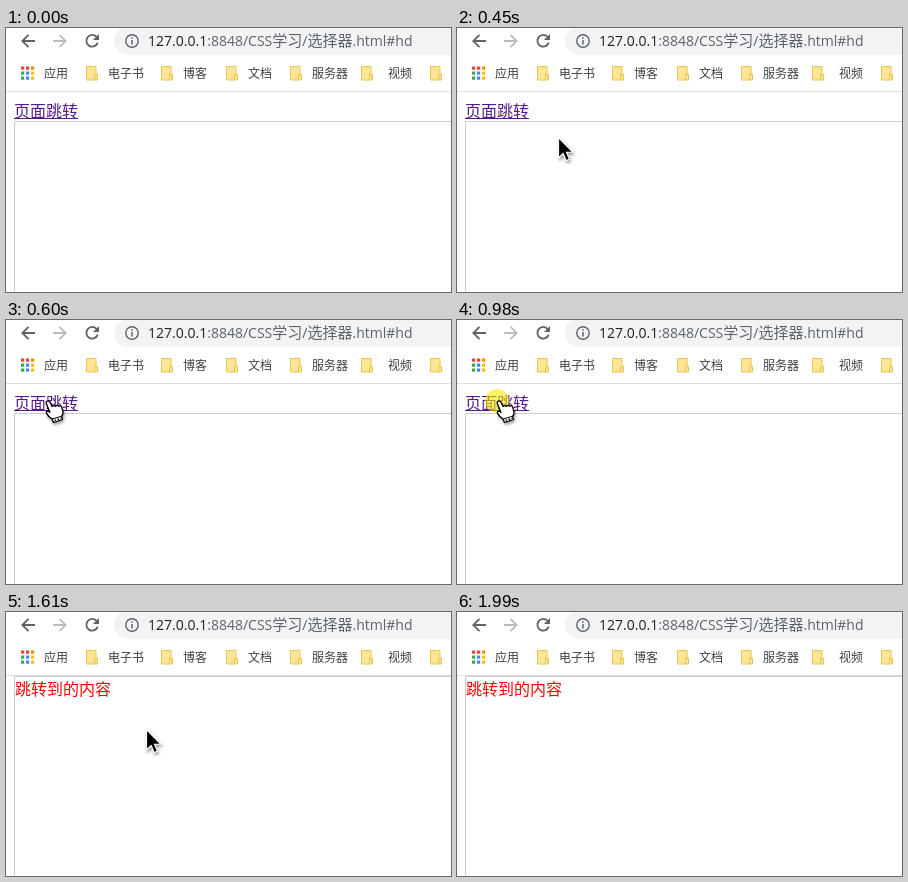
Animation, 445 px wide and 264 px high, one loop 2620 ms. Source, as an HTML page:

```html
<!DOCTYPE html>
<html lang="zh-CN">
<head>
<meta charset="utf-8">
<title>页面跳转</title>
<style>
  html, body { margin: 0; width: 100%; height: 100%; overflow: hidden; background: #fff; }
  svg { display: block; width: 445px; height: 264px; }
  text { font-family: "Open Sans", "Noto Sans CJK SC", "Noto Sans CJK", sans-serif; white-space: pre; }
  .cjk { font-family: "Noto Sans CJK SC", "Noto Sans CJK", sans-serif; }
  .url { font-size: 14px; fill: #5f6368; }
  .url .cjk { font-size: 15px; }
  .mark { font-size: 12px; fill: #3c4043; }
  .body { font-size: 16px; }
  .line { fill: none; stroke-width: 1.8; }
  .cursor { filter: drop-shadow(1px 2px 1.5px rgba(0, 0, 0, .4)); }
</style>
</head>
<body>
<svg viewBox="0 0 445 264">
  <rect width="445" height="264" fill="#fff"/>

  <!-- address bar -->
  <path id="back" class="line" stroke="#5f6368" d="M29 13H16.5M22.5 6.8L16.3 13L22.5 19.2"/>
  <path class="line" stroke="#babcbe" d="M47 13H59.5M53.5 6.8L59.7 13L53.5 19.2"/>
  <path class="line" stroke="#5f6368" d="M90.6 9A5.8 5.8 0 1 0 91.7 14.6"/>
  <path fill="#5f6368" d="M93 6V12H87Z"/>
  <rect x="108" y="-1" width="380" height="28" rx="14" fill="#f1f3f4"/>
  <circle cx="126" cy="13" r="6.2" fill="none" stroke="#5f6368" stroke-width="1.4"/>
  <path stroke="#5f6368" stroke-width="1.5" d="M126 12V16.5M126 9.3V10.8"/>
  <text class="url" x="142" y="18"><tspan fill="#202124">127.0.0.1</tspan>:8848/CSS<tspan class="cjk">学习</tspan>/<tspan class="cjk">选择器</tspan>.html#hd</text>

  <g id="marks"></g>
  <path stroke="#dadce0" d="M0 63.5H445"/>

  <!-- page before and after the jump -->
  <g id="top">
    <text class="body cjk" x="8" y="89" fill="#551a8b">页面跳转</text>
    <path stroke="#551a8b" d="M8 90.5H72"/>
    <path fill="none" stroke="#ccc" d="M445 93.5H8.5V264"/>
  </g>
  <g id="jumped">
    <path fill="none" stroke="#ccc" d="M445 64.5H8.5V264"/>
    <text class="body cjk" x="9" y="82.5" fill="#f00">跳转到的内容</text>
  </g>

  <circle id="press" cx="40" cy="81" r="12" fill="#f5ec00" opacity=".6"/>

  <g id="arrow" class="cursor">
    <path transform="scale(1.22)" fill="#000" stroke="#fff" stroke-width="1"
      d="M.4 .4V17.2L4.2 13.6L6.7 19.4L9.5 18.2L7 12.5H12.3Z"/>
  </g>
  <g id="hand" class="cursor">
    <path fill="#fff" stroke="#000" stroke-width="1.3" stroke-linejoin="round"
      d="M40.5 84Q39.5 81 42 80.8Q43.6 80.8 44.4 83L46 86.5Q48 84.8 49.4 86.4Q51.4 84.6 52.8 86.2
         Q55 85 55.8 87.4L57 92Q57.2 94.5 55.5 96.5L56.5 99.5L47.5 102.5L46 99Q42.5 97 40.8 93.6
         Q39.6 91.4 41.6 91Q43 91 44 92.4Z"/>
    <path fill="none" stroke="#000" d="M46 99L55.5 96.3"/>
    <path stroke="#000" stroke-width="1.4" stroke-dasharray="1.5 1.6" d="M48.6 100.4L55 98.4"/>
  </g>
  <g id="beam" fill="none">
    <path id="stem" stroke="#fff" stroke-width="3" d="M37 74H39.5L40.5 75L41.5 74H44M40.5 75V89M37 90H39.5L40.5 89L41.5 90H44"/>
    <use href="#stem" style="display:none"/>
    <path stroke="#000" stroke-width="1.3" d="M37 74H39.5L40.5 75L41.5 74H44M40.5 75V89M37 90H39.5L40.5 89L41.5 90H44M38.5 82.5H42.5"/>
  </g>
</svg>
<script>
const LOOP = 2620;
const $ = id => document.getElementById(id);

function add(name, attrs, label) {
  const el = document.createElementNS("http://www.w3.org/2000/svg", name);
  for (const key in attrs) el.setAttribute(key, attrs[key]);
  if (label) el.textContent = label;
  $("marks").append(el);
}

// bookmarks: icon x, text x, label
const bookmarks = [
  [80, 102, "电子书"], [155, 177, "博客"], [220, 242, "文档"],
  [284, 306, "服务器"], [355, 382, "视频"], [424, 446, ""]
];
const label = (x, text) => add("text", { x, y: 50, class: "mark cjk" }, text);

const dots = ["#ea4335", "#ea4335", "#fb8c00", "#34a853", "#4285f4", "#fbbc05", "#34a853", "#4285f4", "#fbbc05"];
dots.forEach((fill, i) => add("rect", {
  x: 15 + i % 3 * 5, y: 38.5 + Math.floor(i / 3) * 5, width: 3.2, height: 3.2, fill
}));
label(38, "应用");
for (const [x, tx, text] of bookmarks) {
  add("path", { d: `M${x + .5} 38.5h9.5v8h1.5v5.5h-11z`, fill: "#ffe694", stroke: "#e8c454" });
  add("path", { d: `M${x + 8.5} 52v-5.5h3`, fill: "none", stroke: "#e8c454" });
  label(tx, text);
}

// start time, pointer kind, arrow tip
const steps = [
  [0, ""],
  [290, "arrow", 183, 157],
  [370, "arrow", 141, 132],
  [450, "arrow", 101, 109],
  [520, "arrow", 66, 93],
  [600, "hand"],
  [1070, "beam"],
  [1610, "arrow", 140, 117],
  [1690, "arrow", 215, 160],
  [1770, "arrow", 275, 201],
  [1840, "arrow", 320, 233],
  [1920, "arrow", 347, 254],
  [1990, ""]
];
const show = (id, on) => { $(id).style.display = on ? "" : "none"; };

function draw(now) {
  const t = now % LOOP;
  const [, kind, x, y] = steps.findLast(step => step[0] <= t);
  for (const id of ["arrow", "hand", "beam"]) show(id, id === kind);
  if (kind === "arrow") $("arrow").setAttribute("transform", `translate(${x} ${y})`);
  show("press", t >= 980 && t < 1070);
  show("top", t < 1070);
  show("jumped", t >= 1070);
}

const start = performance.now();
function tick() {
  draw(performance.now() - start);
  requestAnimationFrame(tick);
}
tick();
</script>
</body>
</html>
```
